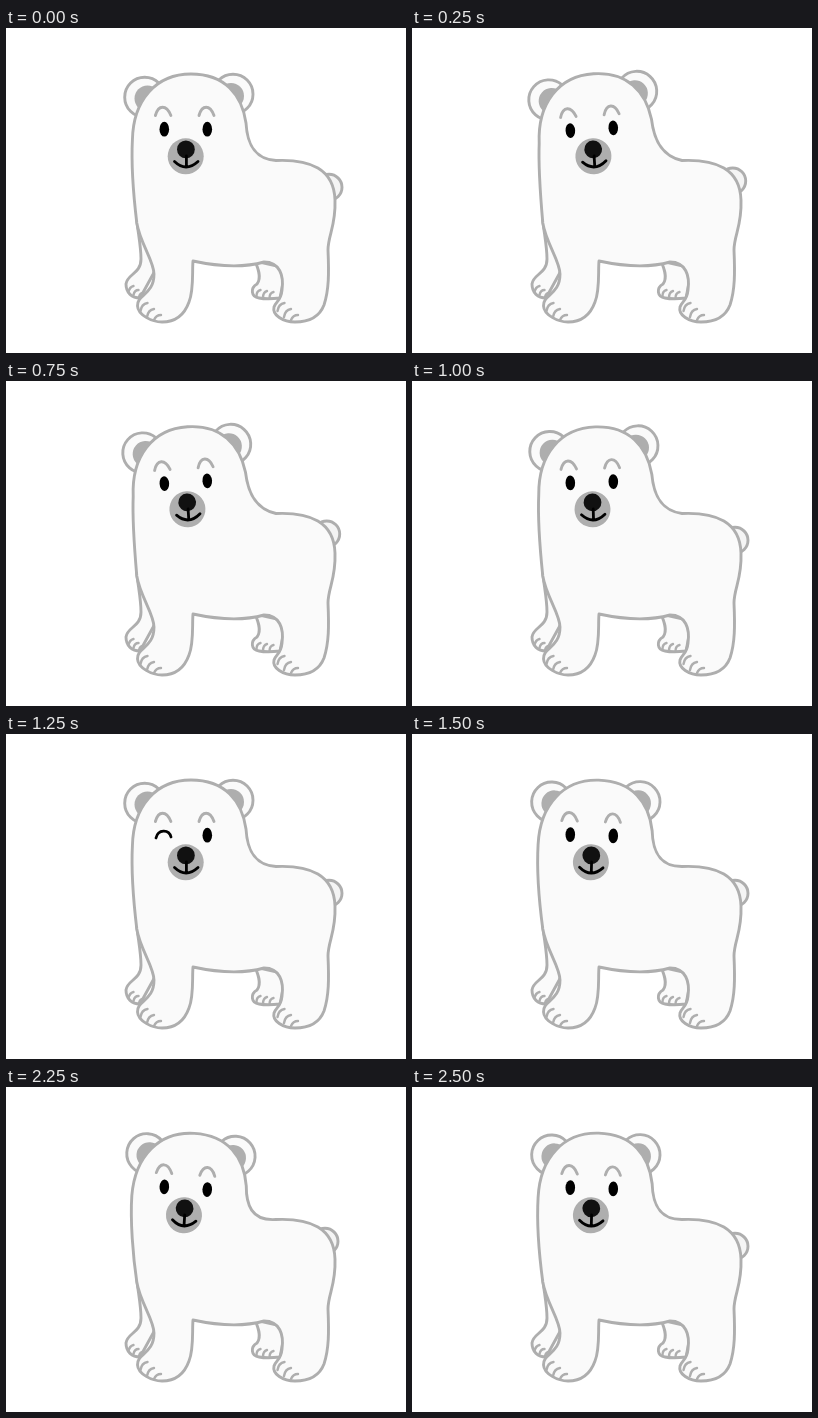
Write an HTML page that moves like this. It is 400x325 px and loops after 2750 ms.

```html
<!DOCTYPE html>
<html lang="en">
<head>
<meta charset="utf-8">
<title>Polar bear</title>
<style>
  html, body { margin: 0; width: 100%; height: 100%; overflow: hidden; background: #fff; }
  svg { display: block; width: 100%; height: 100%; }
  .fur { fill: #fafafa; }
  .line { fill: none; }
  .fur, .line { stroke: #aeaeae; stroke-width: 2.9; stroke-linecap: round; stroke-linejoin: round; }
  .thin { stroke-width: 2.4; }
  .gray { fill: #aeaeae; }
  .ink { fill: none; stroke: #000; stroke-width: 2.8; stroke-linecap: round; }
  #tail { fill: #f4f4f4; }
</style>
</head>
<body>
<svg viewBox="0 0 400 325">
  <circle id="tail" class="fur" r="13"/>

  <!-- far legs -->
  <path class="fur" d="M130.500 190C132 205 135 218 135 231C135 246 121 246 120 256C120 265 126 270 134 270L156 230Z"/>
  <path class="line thin" d="M122.500 264q1-5 5-6M127.500 267q1-5 5-5M133 269q1-4 4-4"/>
  <path class="fur" d="M249 233C252 240 256 250 251 256C244 260 245 269 253 270C258 271 266 271 274 270L280 240Z"/>
  <path class="line thin" d="M250.500 268q0-5 4-6M257 270q0-6 4-7M263.500 270q0-5 4-6"/>

  <g class="head">
    <circle class="fur" cx="138.700" cy="69.200" r="20"/>
    <circle class="gray" cx="141.500" cy="70.500" r="13"/>
    <circle class="fur" cx="227" cy="66.200" r="20"/>
    <circle class="gray" cx="225" cy="68" r="13"/>
  </g>

  <path id="body" class="fur"/>

  <!-- toes -->
  <path class="line thin" d="M134.500 283q1-7 7-8M141 289q1-7 7-8M148 292q2-5 7-5"/>
  <path class="line thin" d="M271.500 283q1-7 7-8M278 289q1-7 7-8M285 292q2-5 7-5"/>

  <g class="head">
    <path class="line" d="M149.400 87.500C152.400 76.500 160.400 76.500 164.900 87.500M193 87.500C196 76.500 204 76.500 208 87.500"/>
    <ellipse id="eye" cx="158.300" cy="101.200" rx="4.800" ry="7.400"/>
    <path id="wink" class="ink" d="M150 104C152 95 163 95 165 103"/>
    <ellipse cx="201.300" cy="101.200" rx="4.800" ry="7.400"/>
    <circle class="gray" cx="179.700" cy="128.300" r="18"/>
    <circle cx="179.900" cy="121.400" r="8.900" fill="#111"/>
    <path class="ink" d="M180.400 128V138M168.500 133.500Q180 144.500 192 133.500"/>
  </g>
</svg>
<script>
const STEP = 250;
const PIVOT = [180, 101];
const tilts = [0, -3.6, -5.3, -3.6, -1.7, 0, 1.7, 3.6, 4.8, 3.6, 1.7];
const tailPos = [[323, 159.3], [320.7, 153], [319, 152], [319, 154.3]];
const tailPose = [0, 1, 2, 1, 0, 0, 0, 1, 2, 3, 0];
const WINK = 5;

const $ = id => document.getElementById(id);
const heads = document.querySelectorAll('.head');

// Rotate a point with the head; weight eases the skin into the still torso.
function turn(deg, x, y, weight = 1) {
  const a = deg * weight * Math.PI / 180;
  const dx = x - PIVOT[0], dy = y - PIVOT[1];
  const c = Math.cos(a), s = Math.sin(a);
  return [PIVOT[0] + dx * c - dy * s, PIVOT[1] + dx * s + dy * c]
    .map(v => v.toFixed(2)).join(' ');
}

function bodyPath(deg) {
  const p = (x, y, w) => turn(deg, x, y, w);
  return `M130.800 195C${p(127.8, 170, 0.2)} ${p(125.2, 135, 0.5)} ${p(126.4, 112)}
    C${p(127.2, 72)} ${p(150, 46)} ${p(185, 46)}
    C${p(219, 46)} ${p(236, 67)} ${p(240, 95)}
    C${p(241, 113)} ${p(246.5, 131, 0.8)} 270 132.500
    C304 131 328 141 329 172C330 198 322 207 322 222
    C323 245 323 262 318 277C313 290 301 294 289 294
    C277 294 266 287 268 279C270 273 275 273 276 262C278 248 274 234 258 234
    C237 240 210 238 187 233C186 244 188 262 183 274
    C178 288 168 294 156 294C146 294 132 287 131.500 278
    C131 266 148 267 148 246C148 233 134 215 130.800 195Z`;
}

let shown = -1;
function draw(now) {
  const i = Math.floor(now / STEP) % tilts.length;
  if (i === shown) return;
  shown = i;
  const deg = tilts[i];
  heads.forEach(h => h.setAttribute('transform', `rotate(${deg} ${PIVOT})`));
  $('body').setAttribute('d', bodyPath(deg));
  const [x, y] = tailPos[tailPose[i]];
  $('tail').setAttribute('cx', x);
  $('tail').setAttribute('cy', y);
  $('eye').setAttribute('visibility', i === WINK ? 'hidden' : 'visible');
  $('wink').setAttribute('visibility', i === WINK ? 'visible' : 'hidden');
}

const start = performance.now();
function tick() {
  draw(performance.now() - start);
  requestAnimationFrame(tick);
}
tick();
</script>
</body>
</html>
```
